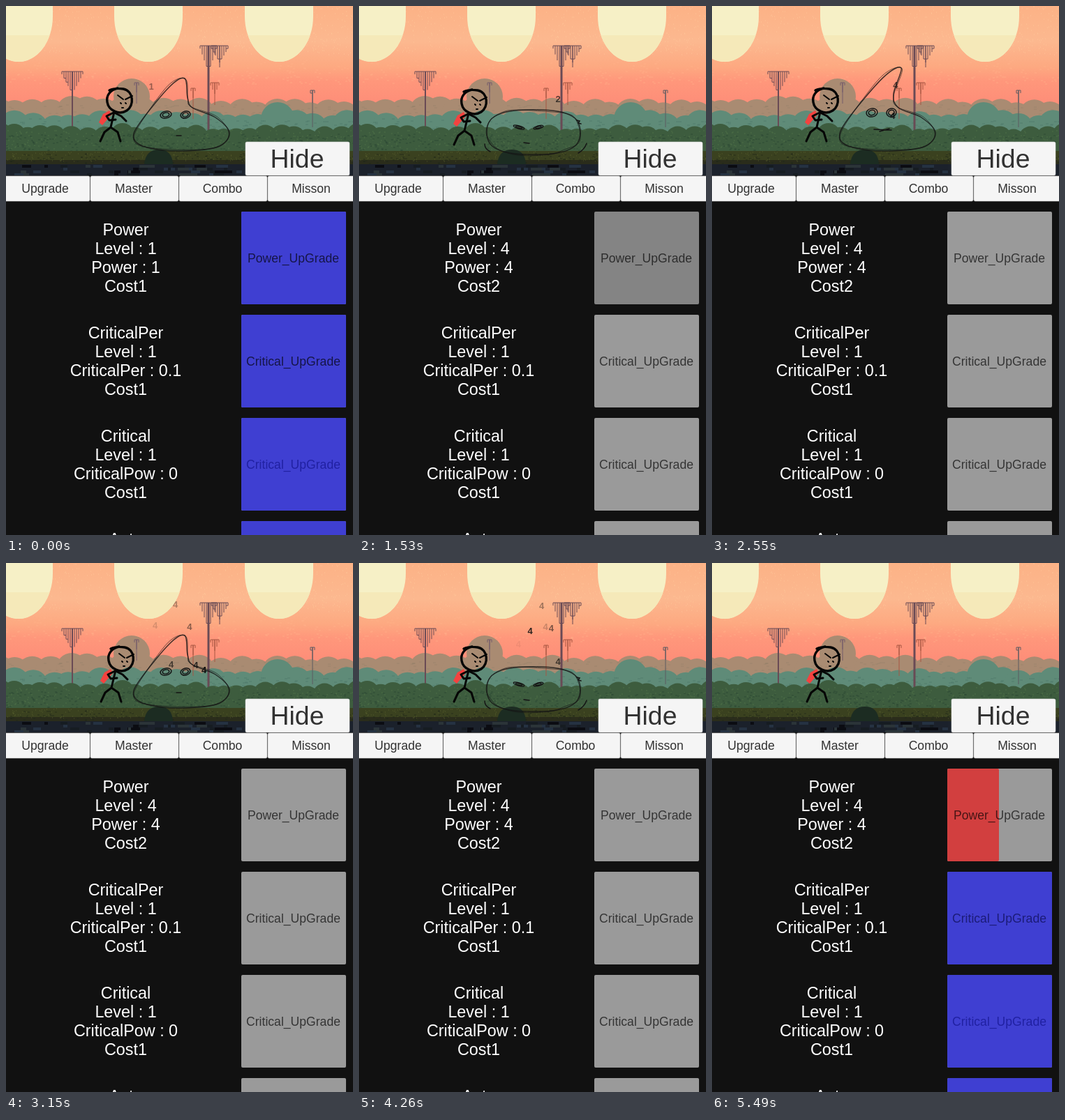
Recreate the animation shown at these times as an HTML page. Size 497 by 759 pixels, loop 5.61 s.

```html
<!DOCTYPE html>
<html lang="en">
<head>
<meta charset="utf-8">
<title>Clicker battle</title>
<style>
  html, body { margin: 0; width: 100%; height: 100%; overflow: hidden; background: #111; }
  svg { display: block; width: 497px; height: 759px; font-family: "Liberation Sans", Arial, sans-serif; }
</style>
</head>
<body>
<svg id="stage" viewBox="0 0 497 759" xmlns="http://www.w3.org/2000/svg"></svg>
<script>
const LOOP = 5610, START = 210, END = 5490, STEP = 30;
const LIFE = 700, RISE = 0.12;
const RELEASED = 2010, KILLED = 4620;
const LEVEL_UPS = [1230, 1350, 1470];
const stage = document.getElementById('stage');

let seed = 7;
const rnd = () => (seed = (seed * 16807) % 2147483647) / 2147483647;
const between = (a, b) => a + rnd() * (b - a);
const lerp = (a, b, k) => a + (b - a) * k;
const levelAt = t => 1 + LEVEL_UPS.filter(u => t >= u).length;

const rect = (x, y, w, h, fill, extra = '') =>
  `<rect x="${x}" y="${y}" width="${w}" height="${h}" fill="${fill}" ${extra}/>`;
const text = (s, x, y, size, fill, extra = '') =>
  `<text x="${x}" y="${y}" font-size="${size}" fill="${fill}" text-anchor="middle" ${extra}>${s}</text>`;
const line = (d, color, width, extra = '') =>
  `<path d="${d}" fill="none" stroke="${color}" stroke-width="${width}" ${extra}/>`;

// Closed smooth curve through points
function blob(p) {
  const n = p.length, at = i => p[(i + n) % n];
  const ctrl = (q, r, s, k) => [0, 1].map(j => (q[j] + k * (s[j] - r[j]) / 6).toFixed(1));
  let d = `M${p[0]}`;
  for (let i = 0; i < n; i++) {
    const [a, b, c, e] = [at(i - 1), at(i), at(i + 1), at(i + 2)];
    d += `C${ctrl(b, a, c, 1)} ${ctrl(c, b, e, -1)} ${c}`;
  }
  return d + 'Z';
}

// ---- scenery ----
function speckle(n, y, h, color, opacity, len) {
  let d = '';
  for (let i = 0; i < n; i++) d += `M${Math.round(between(0, 497))} ${Math.round(between(y, y + h))}h${len}`;
  return line(d, color, 1, `opacity="${opacity}"`);
}

const hill = (x, top, r, color) => `<circle cx="${x}" cy="${top + r}" r="${r}" fill="${color}"/>`;

function ridge(top, spread, r, color) {
  let s = rect(0, top + r * .6, 497, 228 - top - r * .6, color);
  for (let x = -8; x < 510; x += between(.9, 1.5) * r) s += hill(x, top + between(-spread, spread), r, color);
  return s;
}

// Flat comb of twigs hanging from the crown onto a thin trunk
function tree(x, top, bottom, half, depth, color, width) {
  let d = `M${x - half} ${top}h${2 * half}`;
  for (let i = -half; i <= half; i += 3) {
    const drop = 4 + (depth - 4) * (1 - Math.abs(i) / half);
    d += `M${x + i} ${top}v${drop}` + (rnd() < .5 ? `h${-Math.sign(i) * 3}` : '');
  }
  return line(d, color, 1) + line(`M${x} ${top}V${bottom}`, color, width);
}

const sun = x => {
  const arc = (y, half, fill) => `<path d="M${x - half} ${y}A49 65 0 0 0 ${x + half} ${y}Z" fill="${fill}"/>`;
  return rect(x - 49, 0, 98, 15, '#f6f0c6') + arc(15, 49, '#f6f0c6') + arc(42, 44.6, '#f5e9b9');
};

function ground() {
  let s = rect(0, 208, 497, 20, '#3a411f') + rect(0, 221, 497, 6, '#2a2c1b') +
    speckle(220, 209, 14, '#667033', .6, 1) + speckle(160, 212, 14, '#1f2618', .7, 3) +
    '<path d="M198 227q2-21 21-21t20 21z" fill="#1c2c22"/>' + rect(0, 227, 497, 17, '#1b212b');
  for (const tone of ['#0b0c12', '#253242', '#161c22', '#2b3438'])
    for (let i = 0; i < 16; i++)
      s += rect(Math.round(between(0, 490)), 228 + 4 * Math.floor(rnd() * 4), Math.round(between(4, 18)), 4, tone);
  return s;
}

const BROWN = '#a98b72', TEAL = '#5f8b78', GREEN = '#3d5c3e', BARK = '#694a55', RUST = '#a75643';
const scenery = `
  <defs><linearGradient id="sky" x1="0" y1="0" x2="0" y2="145" gradientUnits="userSpaceOnUse">
    <stop offset="0" stop-color="#fcb286"/><stop offset=".35" stop-color="#fcb88f"/>
    <stop offset=".6" stop-color="#fda981"/><stop offset=".74" stop-color="#ff977b"/>
    <stop offset="1" stop-color="#fd8c78"/></linearGradient></defs>` +
  rect(0, 0, 497, 200, 'url(#sky)') +
  speckle(700, 0, 70, '#ffd0a2', .55, 1) + speckle(200, 78, 35, '#ffb48c', .55, 3) +
  [18, 204, 391].map(sun).join('') +
  ridge(134, 5, 22, BROWN) + hill(180, 104, 26, BROWN) + speckle(90, 142, 14, '#94806a', .6, 4) +
  ridge(153, 4, 21, TEAL) + hill(389, 138, 24, TEAL) + speckle(130, 162, 20, '#4c7768', .7, 4) +
  tree(95, 94, 178, 15, 32, BARK, 2) + tree(290, 57, 186, 12, 38, BARK, 3) + tree(306, 57, 88, 12, 24, BARK, 1) +
  tree(268, 118, 162, 3, 14, RUST, 1) + tree(299, 110, 142, 6, 16, RUST, 1) +
  tree(187, 110, 140, 3, 14, '#755d6b', 1) + tree(439, 121, 174, 3, 18, '#5c5b61', 1) +
  ridge(172, 5, 17, GREEN) + speckle(260, 178, 28, '#557a4b', .6, 2) + speckle(260, 184, 24, '#2a4330', .75, 3) +
  ground();

// ---- slime ----
const pointed = (x, y) => [[183, 190], [lerp(183, x, .12), lerp(190, y, .26)], [lerp(183, x, .7), lerp(190, y, .86)],
  [x, y], [260, lerp(146, y, .35)], [267, 146], [300, 160], [320, 182], [303, 202], [250, 208], [202, 203]];

const dome = Array.from({ length: 14 }, (_, i) => {
  const a = i / 7 * Math.PI, soft = v => Math.sign(v) * Math.abs(v) ** .75;
  return [250 + 67 * soft(Math.cos(a)), 181 + 32 * soft(Math.sin(a))];
});

function slime(body, eyeY, open, tilt, marks) {
  const loose = body.map(([x, y], i) => [x + 2 * Math.sin(i * 2.3), y + 2 * Math.cos(i * 1.7)]);
  const eye = (x, rx, angle) => [1, .6].map(k =>
    `<ellipse rx="${rx * k}" ry="${open * k}" transform="translate(${x} ${eyeY}) rotate(${angle})"/>`).join('');
  return '<g fill="none" stroke="#151515" stroke-linecap="round">' +
    `<path d="${blob(body)}" stroke-width="1.5" opacity=".8"/><path d="${blob(loose)}" opacity=".6"/>` +
    `<g stroke-width="1.5">${eye(229, 8, tilt)}${eye(257, 7, -15)}<path d="${marks}"/></g></g>`;
}

const normal = slime(pointed(256, 104), 156, 5, -12, 'M244 186h7');
const tall = slime(pointed(271, 89), 153, 6, -12, 'M232 177l25 1M240 180l14-4');
const squashed = slime(dome, 174, 2, 16, 'M236 196l8 1M312 164l4 1-2 3 4 1M314 211q9-5 12-14M180 198q0 7 8 11');
const bounce = [normal, tall, normal, squashed];

// ---- fighter: k = 0 leans forward, k = 1 sinks back ----
function drawFighter(k) {
  const upper = `transform="translate(${2 * k} ${2 * k})"`;
  const hip = [150 + k, 174 + 5 * k];
  return `<path d="M148 150l-9 5-6 12 5 4 13-15z" fill="#f3423f" ${upper}/>` +
    '<g fill="none" stroke="#050505" stroke-linecap="round" stroke-linejoin="round" stroke-width="3">' +
    `<g ${upper}><path d="M148 121q8-4 20-2c15 3 16 24 5 31s-26 0-28-12c-2-10 5-18 15-20" stroke-width="3.4"/>` +
    '<path d="M160 128l8 6M181 129l-10 5M164 139l1 1M171 139l1 1M166 146h2" stroke-width="2"/>' +
    '<path d="M154 153l-10 5 4 6 9-1M157 154l8 4 7 7"/></g>' +
    `<path d="M${155 + 2 * k} ${152 + 2 * k}L${hip}l-9 7-6 13M${hip}l10 7 4 13"/></g>`;
}

// ---- damage numbers ----
const hits = [];
seed = 20;
for (let born = -190; born < KILLED; born += born < RELEASED - STEP ? 505 : 115)
  hits.push({ born, x: between(208, 290), y: between(105, 205) });

const drawHits = t => hits.filter(h => t >= h.born && t < h.born + LIFE).map(h => {
  const age = t - h.born;
  return text(levelAt(h.born), h.x, (h.y - age * RISE).toFixed(1), 13, '#111',
    `font-weight="bold" opacity="${(1 - age / LIFE).toFixed(2)}"`);
}).join('');

// ---- interface ----
const tabs = ['Upgrade', 'Master', 'Combo', 'Misson'].map((name, i) =>
  rect(-6 + 127 * i, 244, 126, 36, '#f5f5f5', 'rx="2" stroke="#c9c9c9" stroke-width=".6"') +
  text(name, 56 + 127 * i, 268, 17.6, '#323232')).join('');
const hideButton = rect(343, 195, 149, 48, '#f5f5f5', 'rx="2" stroke="#d5d5d5" stroke-width=".6"') +
  text('Hide', 417, 232, 37.4, '#323232');

const BLUE = '#3f3fd2', RED = '#d23f3f', GRAY = '#9a9a9a', INK = 'rgba(0,0,0,.66)', WIDE = 150;
const card = (row, lines, label, base, fill, width, ink) => `<g transform="translate(0 ${148 * row})">` +
  lines.map((s, i) => text(s, 171.5, 329 + 27 * i, 23.35, '#fff')).join('') +
  rect(337, 295, WIDE, 133, base, 'rx="2"') + (fill ? rect(337, 295, width, 133, fill, 'rx="2"') : '') +
  text(label, 411.5, 368, 17.6, ink) + '</g>';

function drawCards(t) {
  const level = levelAt(t), rich = level < 4, paid = t >= KILLED;
  const held = rich ? 0 : Math.max(0, Math.min(1, 1 - (t - RELEASED) / 100));
  const gray = Math.round(lerp(154, 132, held));
  const fill = rich || paid ? BLUE : '';
  return card(0, ['Power', `Level : ${level}`, `Power : ${level}`, `Cost${rich ? 1 : 2}`], 'Power_UpGrade',
      `rgb(${gray},${gray},${gray})`, rich ? BLUE : paid ? RED : '', rich ? WIDE : 74, INK) +
    card(1, ['CriticalPer', 'Level : 1', 'CriticalPer : 0.1', 'Cost1'], 'Critical_UpGrade', GRAY, fill, WIDE,
      paid ? '#1c1c78' : INK) +
    card(2, ['Critical', 'Level : 1', 'CriticalPow : 0', 'Cost1'], 'Critical_UpGrade', GRAY, fill, WIDE,
      fill ? '#2121a2' : INK) +
    card(3, ['Auto'], '', GRAY, fill, WIDE, INK);
}

stage.innerHTML = scenery + '<g id="slime"></g><g id="fighter"></g><g id="hits"></g>' +
  rect(0, 243, 497, 516, '#111') + tabs + hideButton + '<g id="cards"></g>';

const cache = {};
function show(id, markup) {
  if (cache[id] !== markup) document.getElementById(id).innerHTML = cache[id] = markup;
}

const cycle = (t, period) => ((t % period) + period) % period / period;

function render(ms) {
  const t = Math.min(END, Math.max(START, Math.floor(ms / STEP) * STEP));
  const swing = cycle(t - 1050, 230);
  const sink = swing > .86 || swing < .33 ? 1 : swing < .66 ? 0 : .5;
  show('fighter', drawFighter(sink));
  show('slime', t < KILLED ? bounce[Math.floor(cycle(t - START, 700) * 4)] : '');
  show('hits', drawHits(t));
  show('cards', drawCards(t));
}

const begin = performance.now();
function tick() {
  render((performance.now() - begin) % LOOP);
  requestAnimationFrame(tick);
}
tick();
</script>
</body>
</html>
```
